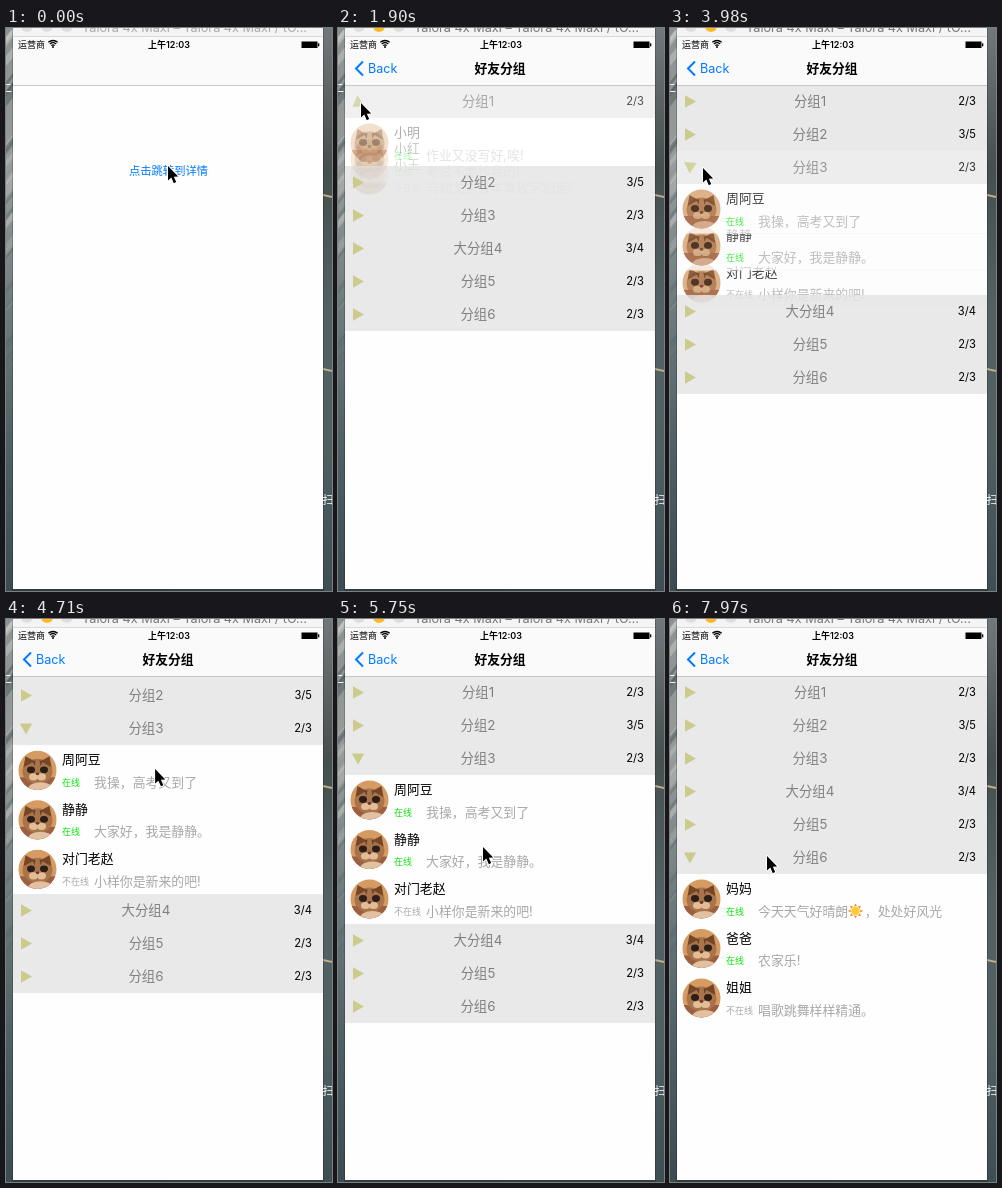
An HTML page with a canvas that plays this animation: 326x563 px, repeating every 8000 ms.

```html
<!DOCTYPE html>
<html lang="zh-CN">
<head>
<meta charset="utf-8">
<style>
  html, body { margin: 0; width: 100%; height: 100%; overflow: hidden; }
  canvas { display: block; width: 326px; height: 563px; }
</style>
</head>
<body>
<canvas id="stage" width="326" height="563"></canvas>
<script>
const ctx = document.getElementById('stage').getContext('2d');
const LOOP = 8000, HEADER = 33, ROW = 49.5, TOP = 57;
const FONT = 'Inter, "Noto Sans CJK SC", "Noto Sans CJK", sans-serif';
const BLUE = '#007aff';

const groups = [
  { name: '分组1', count: '2/3', open: 1787, close: 2697, rows: [
    ['小明', '作业又没写好,唉!'], ['小红', '考试不要抄我的!'], ['小王', '马勒戈壁有本事放学别走!']] },
  { name: '分组2', count: '3/5' },
  { name: '分组3', count: '2/3', open: 3780, close: 6550, rows: [
    ['周阿豆', '我操，高考又到了'], ['静静', '大家好，我是静静。'], ['对门老赵', '小样你是新来的吧!']] },
  { name: '大分组4', count: '3/4' },
  { name: '分组5', count: '2/3' },
  { name: '分组6', count: '2/3', open: 7520, close: Infinity, rows: [
    ['妈妈', '今天天气好晴朗　 ，处处好风光'], ['爸爸', '农家乐!'], ['姐姐', '唱歌跳舞样样精通。']] }
];

// Pointer moves: start, end, then where it comes to rest
const moves = [
  [700, 1200, 24, 58], [1280, 1600, 23, 75], [2900, 3700, 33, 140],
  [4030, 4380, 150, 204], [4380, 4800, 149, 143], [5080, 5650, 145, 228],
  [5780, 6340, 11, 141], [6800, 7320, 19, 236], [7600, 7950, 97, 237]
];
const drag = { from: 4380, to: 5650, y: 204, damping: 0.55 };

const clamp = v => Math.max(0, Math.min(1, v));
const ease = v => { v = clamp(v); return v * v * (3 - 2 * v); };
const random = seed => { const v = Math.sin(seed * 12.9898) * 43758.5453; return v - Math.floor(v); };

function pointer(t) {
  let x = 162, y = 138;
  for (const [start, end, toX, toY] of moves) {
    const p = ease((t - start) / (end - start));
    x += (toX - x) * p;
    y += (toY - y) * p;
  }
  return { x, y };
}

function scrollOffset(t) {
  const dragging = t > drag.from && t < drag.to;
  return dragging ? Math.max(0, (drag.y - pointer(t).y) * drag.damping) : 0;
}

function rect(x, y, w, h, color) {
  ctx.fillStyle = color;
  ctx.fillRect(x, y, w, h);
}

function ellipse(x, y, rx, ry, color) {
  ctx.fillStyle = color;
  ctx.beginPath();
  ctx.ellipse(x, y, rx, ry, 0, 0, 7);
  ctx.fill();
}

function poly(color, ...points) {
  ctx.fillStyle = color;
  ctx.beginPath();
  points.forEach(p => ctx.lineTo(...p));
  ctx.closePath();
  ctx.fill();
}

function text(str, x, y, size, color, align = 'left', weight = 400) {
  ctx.font = `${weight} ${size}px ${FONT}`;
  ctx.textAlign = align;
  ctx.fillStyle = color;
  ctx.fillText(str, x, y);
}

function scoped(draw, alpha = 1, x = 0, y = 0) {
  ctx.save();
  ctx.globalAlpha *= alpha;
  ctx.translate(x, y);
  draw();
  ctx.restore();
}

function clip(x, y, w, h) {
  ctx.beginPath();
  ctx.rect(x, y, w, h);
  ctx.clip();
}

function gradient(x, w, ...colors) {
  const g = ctx.createLinearGradient(0, 0, 0, 563);
  colors.forEach((c, i) => g.addColorStop(i / (colors.length - 1), c));
  rect(x, 0, w, 563, g);
}

function desktop() {
  gradient(0, 163, '#8b9292', '#969c9b', '#6d7b7e', '#4d6065', '#3a4c52');
  gradient(163, 163, '#71787b', '#454f4f', '#526164', '#4f6063', '#3d4e54');
  // Soft diagonal streaks, fading out downwards
  for (let i = 0; i < 30; i++) {
    const y = 330 * random(i), h = 3 + 9 * random(i + 50);
    const color = random(i + 90) > 0.5 ? '#d5d6d0' : '#39474b';
    scoped(() => poly(color, [0, y + 9], [7, y], [7, y + h], [0, y + h + 9]), 0.45 * (1 - y / 400));
  }
  for (const y of [167, 341]) poly('#c0b08a', [317, y - 1], [326, y + 1], [326, y + 3], [317, y + 1]);
  rect(6, 0, 312, 563, 'rgba(0,0,0,.2)');
  text('二', -5, 64, 11, '#fff');
  text('扫', 316.5, 475.5, 11, '#fff');
}

function titleBar(active) {
  rect(7, 0, 310, 9, '#f4f4f4');
  const idle = '#dedede';
  [idle, active ? '#fdb924' : idle, idle].forEach((c, i) => ellipse(21 + i * 20, -2, 6, 6, c));
  text('Talora 4x Maxi – Talora 4x Maxi / tO…', 76, 3.5, 12.7, active ? '#777' : '#aaa');
  rect(7, 8, 310, 1, '#dadada');
}

function statusBar() {
  text('运营商', 12, 20, 9, '#000');
  ctx.strokeStyle = '#000';
  ctx.lineWidth = 1.3;
  [2.5, 4.8, 7].forEach(r => {
    ctx.beginPath();
    ctx.arc(47, 19.5, r, -2.3, -0.84);
    ctx.stroke();
  });
  ellipse(47, 19, 1, 1, '#000');
  text('上午12:03', 163, 20, 9, '#000', 'center', 600);
  rect(295.5, 13.5, 16, 6.5, '#000');
  rect(312, 15.3, 1.3, 3, '#000');
}

function navBar(push) {
  rect(7, 9, 310, 48, '#fafafa');
  rect(7, 57, 310, 0.7, '#b8b8b8');
  statusBar();
  scoped(() => {
    text('好友分组', 162 + 120 * (1 - push), 45, 12.8, '#000', 'center', 600);
    text('Back', 30 + 60 * (1 - push), 45, 12.6, BLUE);
    ctx.strokeStyle = BLUE;
    ctx.lineWidth = 2;
    ctx.beginPath();
    ctx.moveTo(25, 33.5);
    ctx.lineTo(18, 40.5);
    ctx.lineTo(25, 47.5);
    ctx.stroke();
  }, push);
}

function avatar() {
  ctx.beginPath();
  ctx.ellipse(0, 0, 19, 19.6, 0, 0, 7);
  ctx.clip();
  rect(-20, -20, 40, 40, '#d69b62');
  rect(-20, 7, 40, 14, '#9c5f42');
  ellipse(0, 1, 15, 12.5, '#a9744a');
  for (const side of [-1, 1]) {
    poly('#754628', [side * 14, -3], [side * 12, -14], [side * 3, -9]);
    poly('#68432c', [side * 2, -10], [side * 5, -9], [side * 3, -4]);
    ellipse(side * 6.5, -0.5, 4, 3.4, '#2b1d17');
    ellipse(side * 4, 6.5, 4.5, 3.6, '#e2bd98');
  }
  ellipse(0, 3.5, 1.8, 1.4, '#6d3a2c');
  ellipse(3, 18, 12, 6, '#e2c0a2');
}

function sun(x, y) {
  for (let i = 0; i < 8; i++) {
    scoped(() => {
      ctx.rotate(i * Math.PI / 4);
      poly('#f08a1c', [-1.5, -4.8], [0, -7.5], [1.5, -4.8]);
    }, 1, x, y);
  }
  ellipse(x, y, 4.2, 4.2, '#ffcb35');
}

function personRow([name, message], index, moving) {
  rect(7, 0, 310, ROW, '#fefefe');
  if (moving) rect(56, ROW - 0.5, 261, 0.5, '#eee');
  scoped(avatar, 1, 31.5, 25);
  text(name, 56, 19, 12.9, '#000');
  const online = index < 2;
  text(online ? '在线' : '不在线', 56, 40.6, 9, online ? '#0be60b' : '#aaa');
  text(message, 88, 41.6, 12.9, '#a8a8a8');
  if (message.includes('　')) sun(185.5, 37);
}

function groupHeader(group, p, opening) {
  const spin = opening ? ease(p * 1.25) : p ** 1.5;
  scoped(() => {
    rect(7, 0, 310, HEADER, '#e4e4e4cc');
    text(group.name, 140, 21.2, 13.4, '#808080', 'center');
    text(group.count, 306, 20.4, 11.2, '#000', 'right');
    scoped(() => {
      ctx.rotate(-1.5 * Math.PI * spin);
      poly('#cccb8c', [-5, -6.2], [6, 0], [-5, 6.2]);
    }, 1, 20, 16.5);
  }, 1 - 0.55 * Math.sin(Math.PI * p) ** 3);
}

function list(t) {
  rect(7, 57, 310, 504, '#fefefe');
  let y = TOP - scrollOffset(t);
  const headers = [];
  for (const group of groups) {
    const p = group.rows ? ease((t - group.open) / 300) - ease((t - group.close) / 300) : 0;
    headers.push([group, p, y]);
    y += HEADER;
    if (p <= 0) continue;
    // Upper rows cover the lower ones while the section unfolds
    for (let i = 2; i >= 0; i--) {
      scoped(() => personRow(group.rows[i], i, p < 1), p, 0, y + i * ROW * p);
    }
    y += 3 * ROW * p;
  }
  headers.forEach(([group, p, top]) => scoped(() => groupHeader(group, p, t < group.close), 1, 0, Math.round(top)));
}

function home() {
  rect(7, 57, 310, 504, '#fefefe');
  text('点击跳转到详情', 162.5, 147.3, 11.3, BLUE, 'center');
}

function cursor({ x, y }) {
  scoped(() => {
    ctx.lineWidth = 2;
    ctx.lineJoin = 'round';
    ctx.strokeStyle = '#fff';
    ctx.beginPath();
    [[0, 0], [0, 14.5], [3.3, 11.6], [5.8, 17.2], [8.2, 16.1], [5.8, 10.7], [10.2, 10.5]]
      .forEach(p => ctx.lineTo(...p));
    ctx.closePath();
    ctx.stroke();
    ctx.fillStyle = '#000';
    ctx.fill();
  }, 1, x, y);
}

function draw(t) {
  const push = 1 - (1 - clamp((t - 300) / 500)) ** 3;
  desktop();
  titleBar(t >= 150);
  scoped(() => {
    clip(7, 9, 310, 552);
    if (push < 1) scoped(home, 1, -93 * push);
    if (push > 0) scoped(() => list(t), 1, 310 * (1 - push));
    navBar(push);
  });
  cursor(pointer(t));
}

function frame() {
  draw(performance.now() % LOOP);
  requestAnimationFrame(frame);
}
frame();
</script>
</body>
</html>
```
